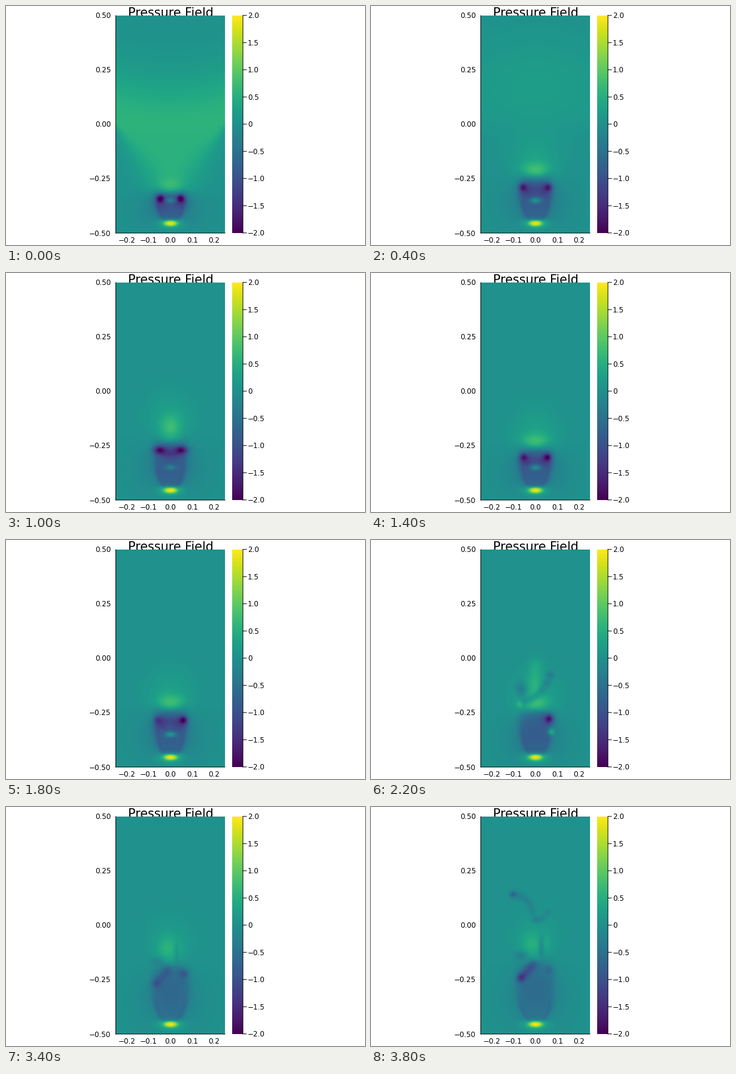
Recreate the animation shown at these times as a matplotlib script. Size 600x400 px, loop 4 s.

```python
import numpy as np
import matplotlib.pyplot as plt
from matplotlib.animation import FuncAnimation
from matplotlib.lines import Line2D

W, H, DPI = 600, 400, 100
FRAMES, STEP = 20, 200
LEFT, TOP, RIGHT, BOTTOM = 183, 16, 366, 380
CX, BASE = 275, 357
SECOND, PLUME = 6, 11  # frames where a new ring and the loose plume start

plt.rcParams["font.family"] = "DejaVu Sans"
X, Y = np.meshgrid(np.arange(LEFT, RIGHT) + 0.5, np.arange(TOP, BOTTOM) + 0.5)
DX = np.abs(X - CX)


def ramp(k, a, b):
    return float(np.clip((k - a) / (b - a), 0, 1))


def sigmoid(v):
    return 1 / (1 + np.exp(-np.clip(v, -40, 40)))


def blob(x, y, sx, sy, a, p=1):
    return a * np.exp(-0.5 * (((X - x) / sx) ** 2 + ((Y - y) / sy) ** 2) ** p)


def pulse(k, peak, lead, fade):
    """Linear rise up to the peak, exponential decay after it."""
    return max(0, 1 - (peak - k) / lead) if k < peak else np.exp((peak - k) / fade)


def streak(p0, p1, p2, size, a, rise=0, n=6):
    """A row of soft dots on a quadratic curve, lifted by rise."""
    total = 0
    for t in np.linspace(0, 1, n):
        x, y = ((1 - t) ** 2 * np.array(p0) + 2 * t * (1 - t) * np.array(p1)
                + t ** 2 * np.array(p2))
        total = total + blob(x, y - rise, size, size, a)
    return total


def start_wave(k):
    upper = np.exp(-(k / 1.6) ** 3)
    lower = np.exp(-1.2 * k ** 1.5)
    crest = 205 - 14 * (DX / 91) ** 2
    rise = np.exp(-(np.maximum(crest - Y, 0) / 86) ** 2)
    below = np.maximum(Y - 198, 0)
    cone = sigmoid((95 - 0.63 * (Y - 198) - DX) / (3 + 0.15 * below))
    mix = lower + (upper - lower) * sigmoid((200 - Y) / 10)
    wave = (0.57 - 0.0012 * below) * rise * cone * mix * sigmoid((312 - Y) / 4)
    return wave + blob(CX, 122, 80, 55, 0.18 * np.exp(-((k - 2) / 0.8) ** 2))


def ring(age, front, flat, skew):
    """Mirrored vortex pair climbing behind the front."""
    grow = 1 - np.exp(-age)
    y = front + 10 + 8 * grow - 4 * flat
    f = blob(CX, 325.5, 6.5, 3.3, 0.6 + 0.4 * grow - 0.4 * flat)
    f += blob(CX, front + 19, 12, 7, -0.25 * grow - 0.3 * flat)
    for side in (-1, 1):
        gain = 1 + side * skew
        f += blob(CX + side * (17 + 5 * grow - 4 * flat), y, 4.5 + 2 * flat, 4.5,
                  (0.45 * grow - 1.2) * gain)
        f += blob(CX + side * (17 + 3 * flat), y + 5 - 5 * flat, 9, 9 - 3 * flat, -0.45)
    return f


def loose_eddies(k):
    """Asymmetric curls torn off the plume."""
    age = k - PLUME
    shed = pulse(k, PLUME, 1, 1.4)
    f = streak((257, 270), (284, 264), (300, 226), 5, -0.42 * shed, 38 * age)
    f += blob(251, 250 - 38 * age, 6, 9, -0.5 * shed)
    f += streak((276, 255), (270, 232), (276, 205), 8, 0.17 * shed, 30 * age)
    f += blob(248, 275 - 15 * age, 4, 4, 0.4 * shed)
    f += blob(301, 321 - 9 * age, 4, 4, 0.95 * shed)

    curl = pulse(k, 14, 2, 2)
    f += streak((255, 271), (267, 276), (271, 294), 5, -0.3 * curl, 5 * (k - 14))
    f += blob(290, 283 - 5 * (k - 14), 4, 9, -0.35 * curl)

    late = pulse(k, 19, 4, 1)
    back = 5 * (k - 19)
    f += streak((249, 287), (260, 277), (272, 262), 5.5, -0.28 * late, back)
    f += blob(251, 286 - back, 5, 5, -0.45 * late)
    f += blob(250, 248 - back, 7, 5, -0.35 * late)
    f += blob(285, 234 - back, 3, 13, -0.45 * late)
    f += blob(293, 228 - back, 7, 12, 0.18 * late)

    hook = pulse(k, 19, 2, 1)
    back = 9 * (k - 19)
    f += blob(237, 146 - back, 4, 4, -0.5 * hook)
    f += streak((239, 147), (268, 150), (274, 188), 4.5, -0.26 * hook, back)
    f += streak((280, 189), (288, 190), (295, 177), 4, -0.22 * hook, back, 3)
    return f


def pressure(k):
    plume = k >= PLUME
    drift = ramp(k, PLUME, 19)
    age = k if k < SECOND else k - SECOND
    if plume:
        front, flat = 285 - 27 * drift, ramp(k, PLUME, 14)
        inner = (loose_eddies(k)
                 + blob(298, front + 14, 4.8, 4.8, -np.exp((PLUME - k) / 7))
                 + blob(297, front + 14, 9, 9, -0.4 * (1 - drift)))
    else:
        front, flat = 282 + 30 * np.exp(-age), ramp(age, 3, 5)
        skew = 0.15 * age if k >= SECOND else 0
        inner = ring(age, front, flat, skew) + loose_eddies(k)

    # Wake: narrow at the inlet, widening upwards, rounded at the front
    half = 15 + (13 + 4 * drift) * (1 - np.exp(-np.maximum(BASE - Y, 0) / 16))
    edge = sigmoid((Y - front - 8 * plume * (DX / 30) ** 2)
                   / (2.5 + 4 * (DX / 25) ** 2))
    wake = -(0.48 - 0.18 * drift) * sigmoid((half - DX) / 3)
    wake -= 0.15 * np.exp(-((DX - half + 4) / 4) ** 2) * sigmoid((Y - 322) / 5)
    halo = blob(CX, (front + BASE) / 2, 36, 14 + (BASE - front) / 4, -0.4 + 0.08 * drift)

    cap_y = front - 12 - (12 + 4 * drift) * flat
    cap_x = CX - 7 * drift
    f = 0.02 + start_wave(k) + halo * edge
    f += (wake * edge + inner) * sigmoid((BASE - 0.5 - Y) / 1.6)
    f += blob(cap_x, cap_y, 17 - 5 * flat, 9 + 5 * flat,
              0.28 + 0.25 * ramp(k, 0, 2) - 0.15 * drift)
    f += blob(CX, cap_y - 15, 27, 29, 0.08 + 0.17 * ramp(k, 0, 2) - 0.1 * drift)

    inlet = blob(CX, 363.5, 9, 4, 1.2, 1.5) + blob(CX, 363.5, 14, 6.5, 0.8)
    return f + inlet * sigmoid((Y - BASE) / 1.2)


fig = plt.figure(figsize=(W / DPI, H / DPI), dpi=DPI, facecolor="white")


def panel(x0, y0, x1, y1, data):
    ax = fig.add_axes([x0 / W, 1 - y1 / H, (x1 - x0) / W, (y1 - y0) / H], zorder=5)
    ax.axis("off")
    return ax.imshow(data, cmap="viridis", vmin=-2, vmax=2, aspect="auto",
                     interpolation="nearest")


def text(x, y, s, px, ha):
    fig.text(x / W, 1 - y / H, s, fontsize=px * 72 / DPI, ha=ha, va="baseline")


def line(x0, y0, x1, y1):
    fig.add_artist(Line2D([x0 / W, x1 / W], [1 - y0 / H, 1 - y1 / H],
                          color="black", lw=0.72, zorder=6, snap=False))


def label(v, digits):
    return f"{v:.{digits}f}".replace("-", "−")


image = panel(LEFT, TOP, RIGHT, BOTTOM, pressure(0))
panel(378, TOP, 396, BOTTOM, np.linspace(2, -2, BOTTOM - TOP)[:, None])

text(CX, 18.5, "Pressure Field", 20.7, "center")
line(183.4, TOP, 183.4, BOTTOM)
line(183.4, BOTTOM, RIGHT, BOTTOM)
line(396, TOP, 396, BOTTOM)
for v in np.linspace(-0.5, 0.5, 5):
    text(175.5, 198 - 364.5 * v + 4.3, label(v, 2), 11.9, "right")
for v in np.linspace(-0.2, 0.2, 5):
    text(CX + 365 * v, 396.3, label(abs(v) if abs(v) < 0.01 else v, 1), 11.9, "center")
for v in np.linspace(-2, 2, 9):
    y = 197.75 - 91 * v
    line(396, y, 402, y)
    text(404, y + 4.3, label(v, 1) if v else "0", 11.9, "left")


def update(k):
    image.set_data(pressure(k))
    return [image]


anim = FuncAnimation(fig, update, frames=FRAMES, interval=STEP, repeat=True,
                     repeat_delay=0, blit=False)
plt.show()
```
